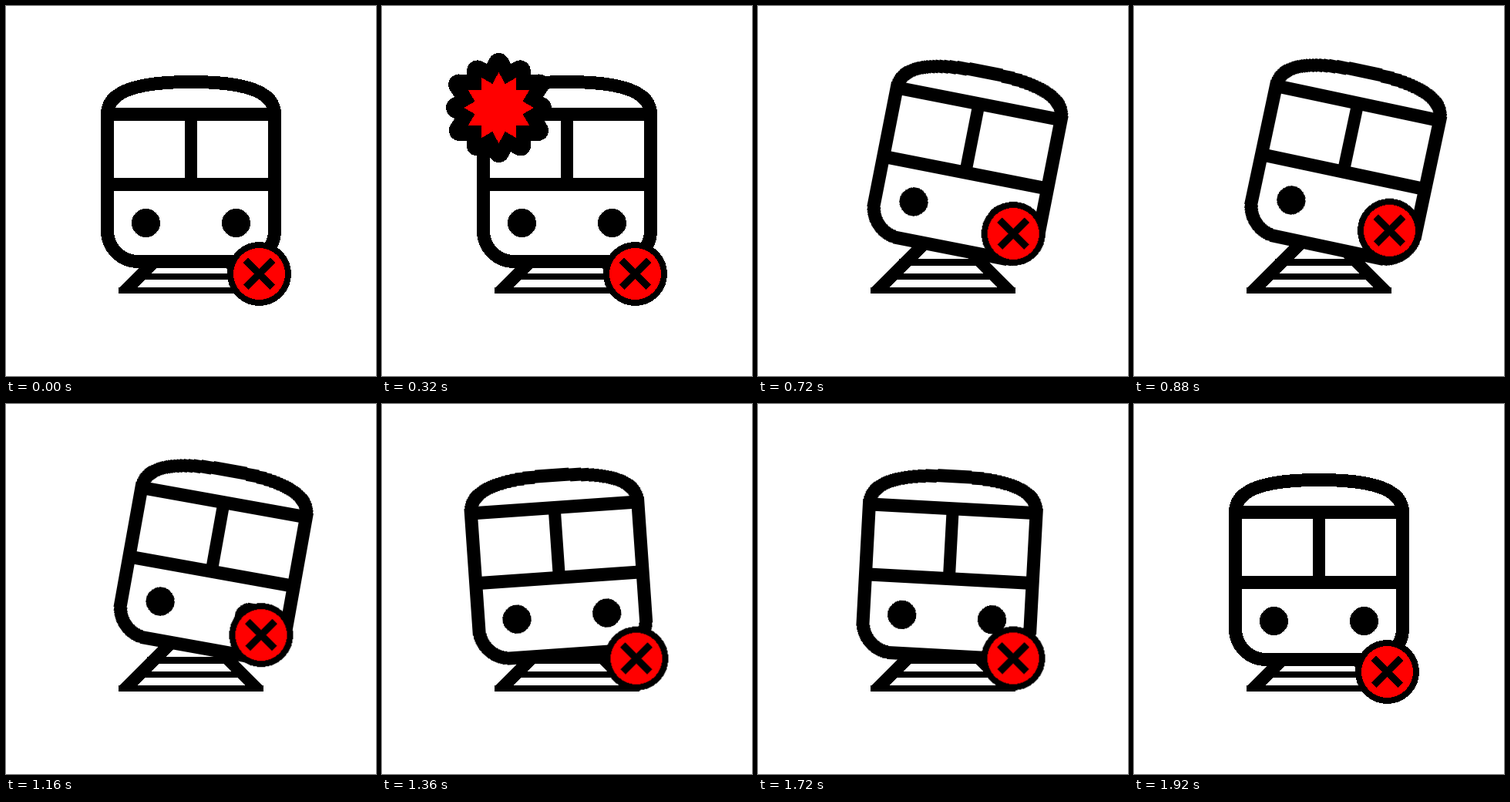
Animation of 480 by 480 pixels, one loop 1960 ms. Source, as an HTML page:

```html
<!DOCTYPE html>
<html lang="en">
<head>
<meta charset="utf-8">
<title>Train accident</title>
<style>
  html, body { margin: 0; width: 100%; height: 100%; overflow: hidden; background: #fff; }
  svg { display: block; width: 100%; height: 100%; shape-rendering: crispEdges; }

  #tiltRight, #tiltLeft, #badge, #burst {
    animation: 1960ms cubic-bezier(.37, 0, .63, 1) infinite;
  }
  #tiltRight { transform-origin: 333.5px 373.5px; animation-name: right; }
  #tiltLeft { transform-origin: 145px 373.5px; animation-name: left; }
  #badge { animation-name: hop; }
  #burst { transform-origin: 151.5px 132px; animation-name: burst; }

  /* The train rocks on the right rail end, then the left, then the right. */
  @keyframes right {
    0% { transform: rotate(0deg); }
    20.408% { transform: rotate(0deg); animation-timing-function: ease; }
    44.898%, 57.143% { transform: rotate(12deg); }
    65.306%, 81.633% { transform: rotate(0deg); }
    89.796% { transform: rotate(3.6deg); }
    97.959%, 100% { transform: rotate(0deg); }
  }
  @keyframes left {
    0%, 65.306% { transform: rotate(0deg); }
    73.469% { transform: rotate(-7.8deg); }
    81.633%, 100% { transform: rotate(0deg); }
  }
  @keyframes hop {
    0% { transform: translate(0, 0); }
    20.408% { transform: translate(0, 0); animation-timing-function: ease; }
    44.898%, 57.143% { transform: translate(2.9px, -56.3px); }
    65.306% { transform: translate(0, 0); }
    73.469% { transform: translate(2.9px, -34px); }
    81.633% { transform: translate(0, 0); }
    89.796% { transform: translate(2.9px, -20.3px); }
    97.959%, 100% { transform: translate(0, 0); }
  }
  @keyframes burst {
    0% { transform: scale(0); animation-timing-function: ease; }
    16.327%, 26.531% { transform: scale(1); }
    36.735%, 100% { transform: scale(0); }
  }
</style>
</head>
<body>
<svg viewBox="0 0 480 480">
  <g id="rails">
    <path d="M146 373V366L207 306H229L169 366V373Z M334 373V366L273 306H251L311 366V373Z"/>
    <path d="M146 365H334V373H146Z M165 347H315V355H165Z M183 328H297V337H183Z"/>
  </g>

  <g id="tiltRight">
    <g id="tiltLeft">
      <g fill="none" stroke="#000" stroke-width="17">
        <path fill="#fff" d="M131.5 140.5C131.5 110 172 98.5 240 98.5S348.5 110 348.5 140.5V291.5A40 40 0 0 1 308.5 331.5H171.5A40 40 0 0 1 131.5 291.5Z"/>
        <path d="M131.5 140.5H348.5M131.5 231.5H348.5"/>
        <path stroke-width="16" d="M240 140.5V231.5"/>
      </g>
      <circle cx="181.5" cy="281.5" r="18.5"/>
      <circle cx="298.5" cy="281.5" r="18.5"/>
    </g>
  </g>

  <g id="badge" stroke="#000">
    <circle cx="328.5" cy="347.5" r="37.5" fill="#f00" stroke-width="8"/>
    <path d="M311 330L346 365M346 330L311 365" stroke-width="9"/>
  </g>

  <g id="burst">
    <path id="rim" stroke="#000" stroke-width="27" stroke-linejoin="round"/>
    <path id="core" fill="#f00"/>
  </g>
</svg>
<script>
  // Twelve-pointed star; tips may differ in length and repeat around.
  function star(tips, inner) {
    const points = [];
    for (let i = 0; i < 24; i++) {
      const r = i % 2 ? inner : tips[(i / 2) % tips.length];
      const a = i * Math.PI / 12;
      points.push((151.5 + r * Math.sin(a)).toFixed(2) + " " + (132 - r * Math.cos(a)).toFixed(2));
    }
    return "M" + points.join("L") + "Z";
  }
  document.getElementById("rim").setAttribute("d", star([57.5, 55.5, 60, 55, 59, 56.5, 57.5, 56.5, 59, 55, 60, 55.5], 40));
  document.getElementById("core").setAttribute("d", star([46, 45, 46, 45.5], 32));
</script>
</body>
</html>
```
